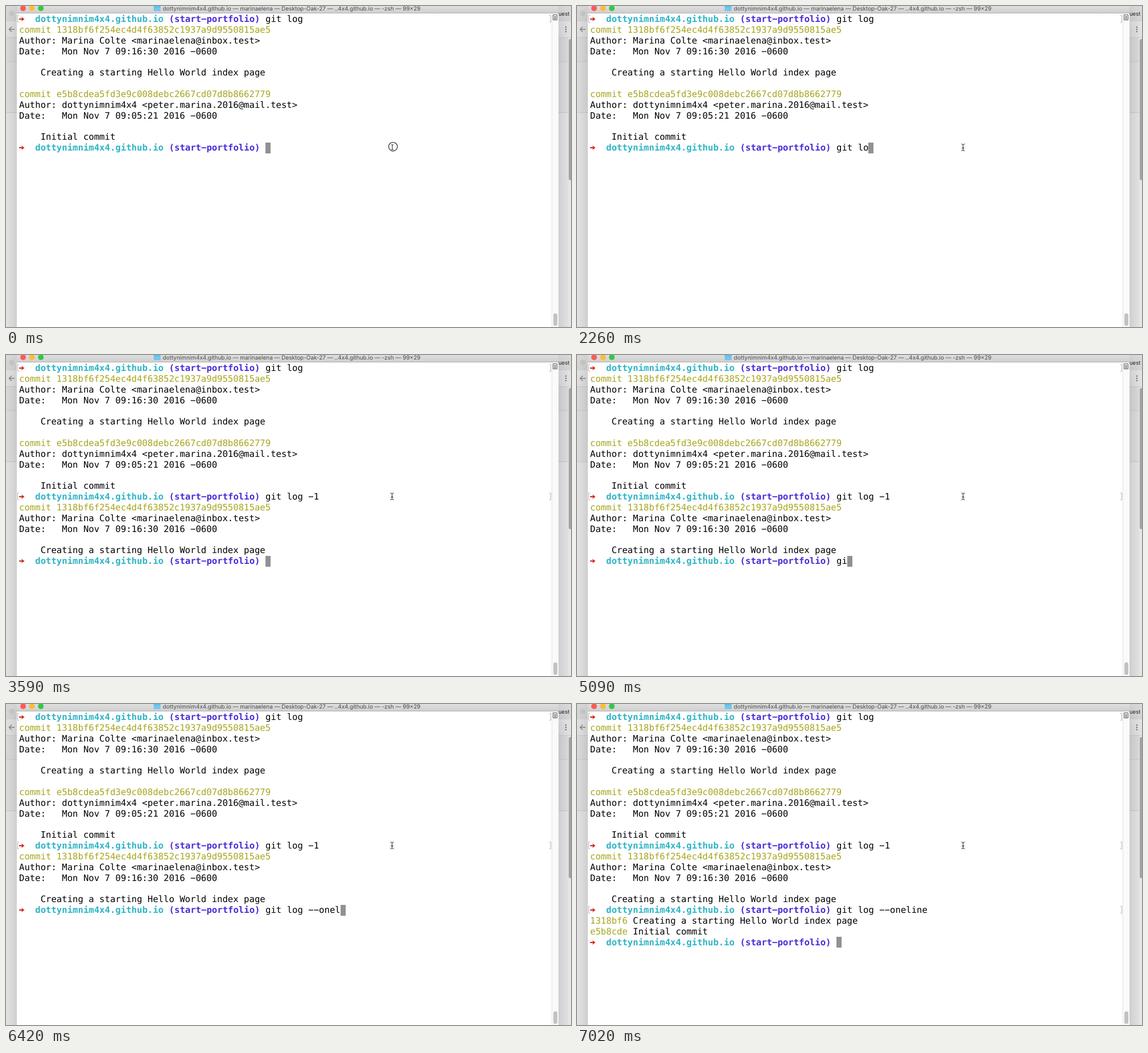
These frames come from a looping animation (993x564 px, 8000 ms). An HTML page with a canvas:

```html
<!DOCTYPE html>
<html lang="en">
<head>
<meta charset="utf-8">
<title>git log</title>
<style>
html, body { margin: 0; width: 100%; height: 100%; overflow: hidden; }
canvas { display: block; }
</style>
</head>
<body>
<canvas id="stage" width="993" height="564"></canvas>
<script>
const ctx = document.getElementById('stage').getContext('2d');
const LOOP = 8000, CELL = 9.413, ROW = 18.84, LEFT = 23, TOP = 13.5;
const MONO = "15.636px 'DejaVu Sans Mono', monospace";
const UI = "9.96px Inter, sans-serif";
const YELLOW = '#a8a51e', CYAN = '#2fb4c5', BLUE = '#4a2bd8', RED = '#cf2a1b';

const REPO = 'dottynimnim4x4.github.io';
const HOME_TITLE = REPO + ' — marinaelena — Desktop-Oak-27 — ..4x4.github.io — -zsh — 99×29';
const SHA1 = '1318bf6f254ec4d4f63852c1937a9d9550815ae5';
const SHA2 = 'e5b8cdea5fd3e9c008debc2667cd07d8b8662779';
const MSG = 'Creating a starting Hello World index page';

const entry = (sha, author, time, msg) =>
  ['commit ' + sha, 'Author: ' + author, 'Date:   Mon Nov 7 ' + time + ' 2016 -0600', '', '    ' + msg];
const newest = entry(SHA1, 'Marina Colte <marinaelena@inbox.test>', '09:16:30', MSG);
const oldest = entry(SHA2, 'dottynimnim4x4 <peter.marina.2016@mail.test>', '09:05:21', 'Initial commit');

// keys: [time, typed characters]; enter: command starts; done: output appears
const commands = [
  { row: 0, text: 'git log', keys: [], enter: -1, done: -1, output: [...newest, '', ...oldest] },
  { row: 12, text: 'git log -1', enter: 3440, done: 3590, output: newest,
    keys: [[1670, 1], [1820, 2], [1970, 3], [2110, 4], [2260, 6], [2410, 7], [2560, 8], [3000, 9], [3300, 10]] },
  { row: 18, text: 'git log --oneline', enter: 6870, done: 7020,
    output: [SHA1.slice(0, 7) + ' ' + MSG, SHA2.slice(0, 7) + ' Initial commit'],
    keys: [[4940, 1], [5090, 2], [5240, 4], [5380, 5], [5530, 6], [5680, 8], [5830, 9], [5980, 10],
           [6120, 11], [6270, 13], [6420, 14], [6570, 16], [6720, 17]] },
  { row: 21, text: '', keys: [], enter: LOOP, done: LOOP, output: [] }
];

const rowTop = row => TOP + row * ROW;
const baseline = row => Math.floor(rowTop(row) + 15);

function rect(x, y, w, h, color) {
  ctx.fillStyle = color;
  ctx.fillRect(x, y, w, h);
}

function pill(x, y, w, h, r, color) {
  ctx.fillStyle = color;
  ctx.beginPath();
  ctx.roundRect(x, y, w, h, r);
  ctx.fill();
}

function dot(x, y, r, color) {
  pill(x - r, y - r, 2 * r, 2 * r, r, color);
}

function stroke(path, color, width = 1) {
  ctx.strokeStyle = color;
  ctx.lineWidth = width;
  ctx.stroke(new Path2D(path));
}

function label(str, x, y, color, font) {
  ctx.font = font;
  ctx.fillStyle = color;
  ctx.fillText(str, x, y);
}

// The minus glyph gives the terminal its long hyphen.
function print(str, col, row, color = '#000', bold = false) {
  label(str.replace(/-/g, '−'), LEFT + col * CELL, baseline(row), color, (bold ? 'bold ' : '') + MONO);
}

function cursor(col, row) {
  const x = Math.round(LEFT + col * CELL);
  rect(x, Math.round(rowTop(row)), 9, 19, '#919191');
}

function backdrop() {
  rect(0, 0, 993, 564, '#f0f0f0');
  rect(0, 0, 993, 27, '#dedede');
  rect(0, 27, 993, 29, '#ededed');
  rect(0, 56, 993, 41, '#e6e6e6');
  rect(0, 97, 993, 90, '#e9e9e9');
  for (const y of [55, 97, 187]) rect(0, y, 993, 1, '#d6d6d6');
  dot(10, 13, 5, '#d0d0d0');
  stroke('M15 41H6M10 36.5L5.5 41L10 45.5', '#8c8c8c', 1.4);
  rect(988, 56, 5, 508, '#f2f2f2');

  ctx.save();
  ctx.shadowColor = 'rgba(0,0,0,.28)';
  ctx.shadowBlur = 42;
  ctx.shadowOffsetY = 18;
  rect(19, -12, 952, 620, '#fff');
  ctx.restore();

  label('uest', 971, 17, '#222', "9.5px Inter, sans-serif");
  for (const y of [37, 41, 45]) dot(984, y, 1.3, '#777');
  pill(989, 58, 6, 248, 3, '#a3a3a3');
}

function windowFrame(title) {
  const bar = ctx.createLinearGradient(0, 0, 0, 12);
  bar.addColorStop(0, '#dedede');
  bar.addColorStop(1, '#d0d0d0');
  rect(19, 0, 952, 12, bar);
  rect(19, 12, 952, 1, '#b0b0b0');
  ['#fc5b57', '#fdbc38', '#33c748'].forEach((color, i) => dot(30 + 15.6 * i, 4, 5, color));

  ctx.font = UI;
  const x = 502 - ctx.measureText(title).width / 2;
  label(title, x, 8, '#4b4b4b', UI);
  pill(x - 16, 0, 12, 9, 1, '#72c7f0');
  rect(x - 16, 1, 12, 1, '#54b2e0');

  rect(959, 13, 12, 551, '#fafafa');
  rect(959, 13, 1, 551, '#e2e2e2');
  pill(962, 540, 7, 22, 3.5, '#c2c2c2');
  stroke('M961.5 15.5H968.5V24.5H961.5ZM963 18.5H967M963 20.5H967M963 22.5H967', '#555');
}

function prompt(row) {
  const y = baseline(row) - 5;
  ctx.fillStyle = RED;
  ctx.fill(new Path2D(`M23 ${y - 1}H28L27 ${y - 4}L32.4 ${y}L27 ${y + 4}L28 ${y + 1}H23Z`));
  print(REPO, 3, row, CYAN, true);
  print('(start-portfolio)', 28, row, BLUE, true);
}

function brackets(row) {
  const y = Math.floor(rowTop(row)) + 3.5;
  stroke(`M23 ${y}H20.5V${y + 12}H23M955 ${y}H957.5V${y + 12}H955`, '#b4b4b4');
}

function outputLine(str, row) {
  const hash = str.match(/^(commit )?[0-9a-f]{7,40}\b/);
  const head = hash ? hash[0] : '';
  print(head, 0, row, YELLOW);
  print(str.slice(head.length), head.length, row);
}

function drawCommand(cmd, t) {
  const typed = cmd.keys.reduce((n, [time, count]) => t >= time ? count : n, 0);
  const entered = t >= cmd.enter;
  prompt(cmd.row);
  print(entered ? cmd.text : cmd.text.slice(0, typed), 46, cmd.row);
  if (!entered) return cursor(46 + typed, cmd.row);
  brackets(cmd.row);
  if (t < cmd.done) return cursor(0, cmd.row + 1);
  cmd.output.forEach((str, i) => outputLine(str, cmd.row + 1 + i));
}

function pointer(t) {
  if (t < 150) {
    ctx.beginPath();
    ctx.arc(680.2, 247.2, 7.7, 0, 7);
    ctx.strokeStyle = '#222';
    ctx.lineWidth = 1.2;
    ctx.stroke();
    stroke('M677 243.5Q679 243.5 679 245Q679 243.5 681 243.5M679 245V251.5M677 252.5Q679 252.5 679 251Q679 252.5 681 252.5', '#222');
  } else {
    stroke('M675.5 242.5Q678.5 242.5 678.5 244.5Q678.5 242.5 681.5 242.5M678.5 244V253M675.5 254.5Q678.5 254.5 678.5 252.5Q678.5 254.5 681.5 254.5M676.5 249.5H680.5', '#222');
  }
}

function draw(t) {
  ctx.textRendering = 'geometricPrecision';
  const running = commands.find(c => t >= c.enter && t < c.done);
  backdrop();
  windowFrame(running ? `${REPO} — ${running.text} — git — -zsh — 99×29` : HOME_TITLE);
  for (const cmd of commands) {
    drawCommand(cmd, t);
    if (t < cmd.done) break;
  }
  pointer(t);
}

const start = performance.now();
function tick() {
  draw((performance.now() - start) % LOOP);
  requestAnimationFrame(tick);
}
tick();
</script>
</body>
</html>
```
